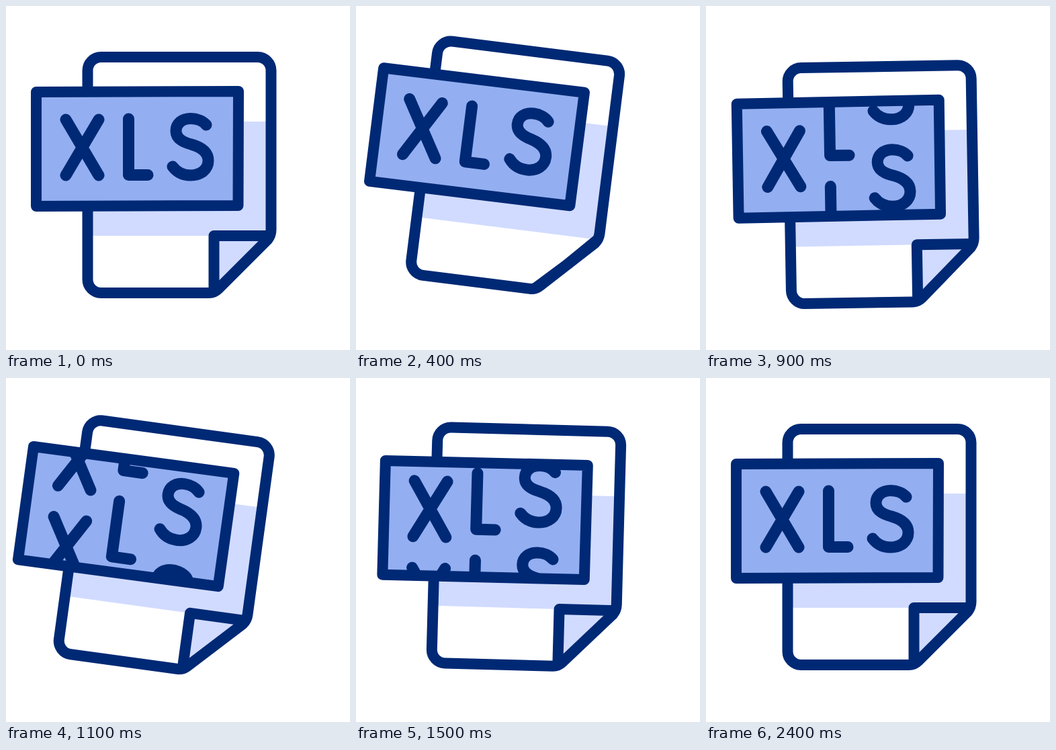
An HTML page for the animation above (2.5 s loop, 512 by 512 pixels).

```html
<!DOCTYPE html>
<html lang="en">
<head>
<meta charset="utf-8">
<title>XLS file icon</title>
<style>
  html, body { margin: 0; height: 100%; overflow: hidden; background: #fff; }
  svg { display: block; width: 100vw; height: 100vh; }
  .line { fill: none; stroke: #002975; stroke-width: 16; stroke-linecap: round; stroke-linejoin: round; }
</style>
</head>
<body>
<svg viewBox="0 0 512 512">
  <defs>
    <path id="label" d="M45 128L346 127 345.5 297 45 298Z"/>
    <clipPath id="window"><use href="#label"/></clipPath>
    <path id="X" d="M89 169L138 252M138 169L89 252"/>
    <path id="L" d="M182.5 168V251.5H211"/>
    <path id="S" d="M298 177C293 171 284 167.5 275 167.5C262 167.5 253 175 253 186C253 198 264 203 276 206C290 210 301 217 301 230C301 243 290 252 275 252C263 252 254 247 248 239"/>
  </defs>
  <g id="icon">
    <path fill="#d1dbff" d="M121 172H394V342H121Z"/>
    <path id="fold" class="line" style="fill:#d1dbff"/>
    <path class="line" d="M141.5 76H374.5a20 20 0 0 1 20 20V333q0 8 -5 14.5L316 421q-6 6 -14 6H141.5a20 20 0 0 1 -20 -20V96a20 20 0 0 1 20 -20Z"/>
    <use href="#label" fill="#93aff1"/>
    <g clip-path="url(#window)"><g id="letters" class="line" style="stroke-width:17"></g></g>
    <use href="#label" class="line"/>
    <path id="glow" class="line" style="stroke:#ffc84b;stroke-width:18" pathLength="1" d="M345 127L45 128 45 298 345.5 297 346 127"/>
  </g>
</svg>
<script>
const $ = id => document.getElementById(id);
const LOOP = 2500, STEP = 100;
const PITCH = 129.5, TURNS = 3, SPIN_END = 1980;

const part = (t, from, to) => Math.min(1, Math.max(0, (t - from) / (to - from)));
const ease = (t, from, to) => (1 - Math.cos(Math.PI * part(t, from, to))) / 2;

// Turning points of the swing
const swing = [
  { at: 0, angle: 0, lift: 0 },
  { at: 330, angle: 8.5, lift: -12 },
  { at: 720, angle: -9, lift: 24.5 },
  { at: 1090, angle: 7.8, lift: 3 },
  { at: 1670, angle: 0, lift: 0 }
];
const pose = (t, key) => swing.slice(1).reduce((sum, turn, i) =>
  sum + (turn[key] - swing[i][key]) * ease(t, swing[i].at, turn.at), 0);

// Letters roll downwards like slot-machine reels and slow to a stop
const reels = [
  { name: "X", start: 400, power: 2.9 },
  { name: "L", start: 470, power: 2.4 },
  { name: "S", start: 600, power: 2.2 }
];
for (const { name } of reels) {
  $("letters").innerHTML +=
    `<g id="reel${name}"><use href="#${name}"/><use href="#${name}" y="${-PITCH}"/></g>`;
}

function draw(t) {
  $("icon").setAttribute("transform",
    `translate(0 ${pose(t, "lift")}) rotate(${pose(t, "angle")} 256 84)`);

  const open = 42.5 * (ease(t, 0, 300) - ease(t, 400, 680));
  $("fold").setAttribute("d", `M309.5 425L${309.5 + open} ${342 + open}L392.5 342`);

  for (const { name, start, power } of reels) {
    const turns = TURNS * (1 - (1 - part(t, start, SPIN_END)) ** power);
    $("reel" + name).setAttribute("transform", `translate(0 ${turns % 1 * PITCH})`);
  }

  const tail = ease(t, 2000, 2350), length = ease(t, 1700, 2000) - tail;
  const glow = $("glow").style;
  glow.display = length > 0.001 ? "" : "none";
  glow.strokeDasharray = `${length} 2`;
  glow.strokeDashoffset = -tail;
}

const begin = performance.now();
function tick() {
  const t = (performance.now() - begin) % LOOP;
  draw(Math.floor(t / STEP) * STEP);
  requestAnimationFrame(tick);
}
tick();
</script>
</body>
</html>
```
